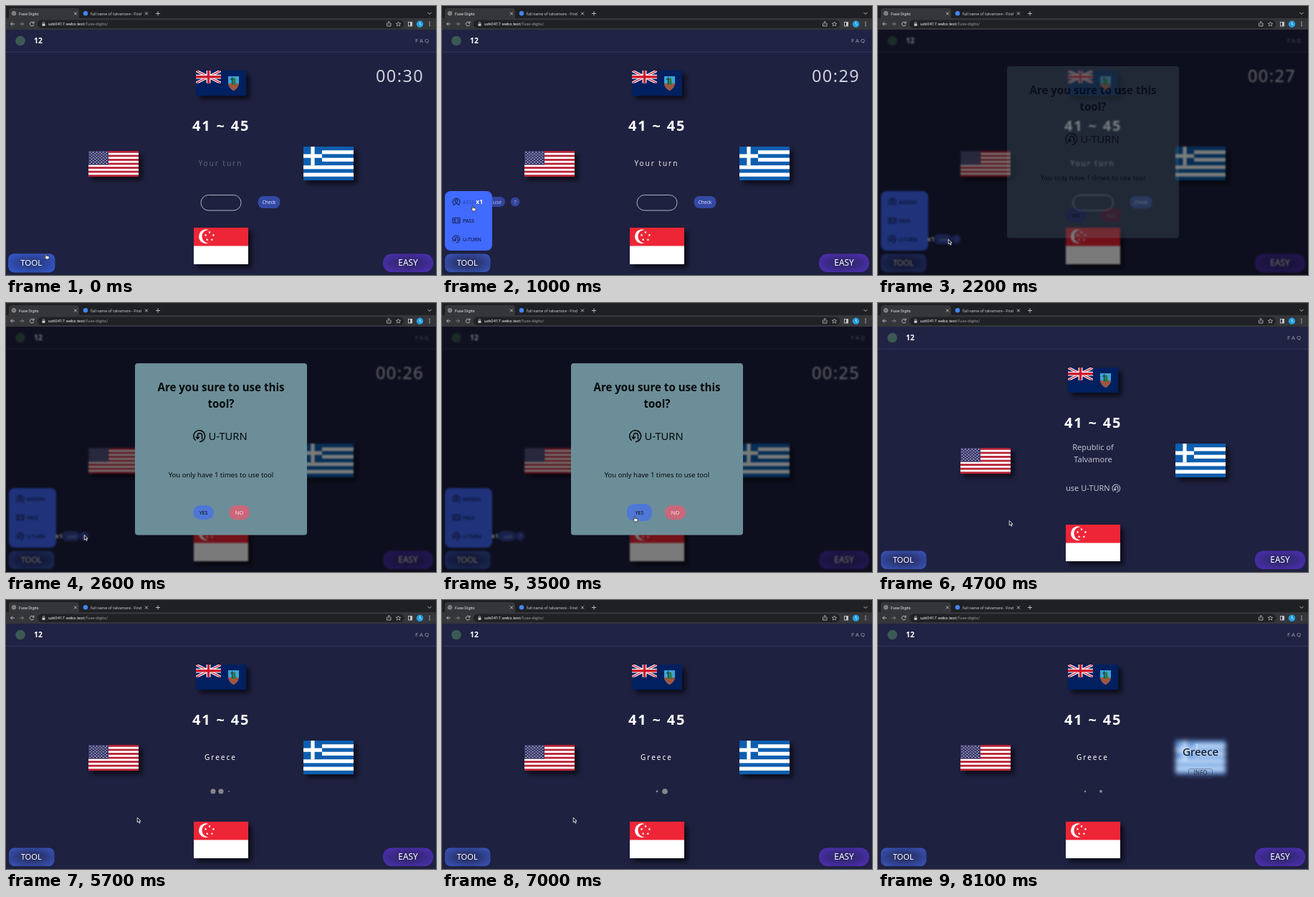
These frames come from a looping animation (600 px wide and 375 px high, 8200 ms). An HTML page:

```html
<!DOCTYPE html>
<html lang="en">
<head>
<meta charset="utf-8">
<title>Fuse Digits</title>
<style>
html, body { margin: 0; width: 100%; height: 100%; overflow: hidden; background: #1f2140; }
svg { display: block; }
text { font-family: 'Noto Sans', sans-serif; white-space: pre; }
.ui text { font-family: Roboto, sans-serif; }
.mid { text-anchor: middle; }
.line { fill: none; stroke: currentColor; }
.flag { filter: drop-shadow(5px 5px 3px #0009); }
</style>
</head>
<body>
<svg id="stage" width="600" height="375" viewBox="0 0 600 375"></svg>
<script>
const LOOP = 8200;
const $ = id => document.getElementById(id);
const ramp = (t, a, b) => Math.min(1, Math.max(0, (t - a) / (b - a)));
const ease = p => p * p * (3 - 2 * p);
const range = (n, f) => Array.from({ length: n }, (_, i) => f(i)).join('');

const rect = (x, y, w, h, fill, more = '') =>
  `<rect x="${x}" y="${y}" width="${w}" height="${h}" fill="${fill}" ${more}/>`;
const disc = (x, y, r, fill, more = '') =>
  `<circle cx="${x}" cy="${y}" r="${r}" fill="${fill}" ${more}/>`;
const path = (d, stroke, w, more = '') =>
  `<path d="${d}" fill="none" stroke="${stroke}" stroke-width="${w}" ${more}/>`;
const text = (x, y, size, fill, str, more = '') =>
  `<text x="${x}" y="${y}" font-size="${size}" fill="${fill}" ${more}>${str}</text>`;
const mid = 'class="mid"', bold = 'font-weight="700"';
const spaced = n => `letter-spacing="${n}"`;
const icon = (id, x, y, s) => `<use href="#${id}" transform="translate(${x} ${y}) scale(${s})"/>`;

function star(x, y, r) {
  const pts = Array.from({ length: 10 }, (_, i) => {
    const a = i * Math.PI / 5, d = i % 2 ? r * .4 : r;
    return `${x + d * Math.sin(a)},${y - d * Math.cos(a)}`;
  });
  return `<polygon points="${pts.join(' ')}" fill="#fff"/>`;
}

function glow(id, inner, outer) {
  return `<radialGradient id="${id}" r=".62"><stop offset=".15" stop-color="${inner}"/>
    <stop offset="1" stop-color="${outer}"/></radialGradient>`;
}

const defs = `<defs>
  ${glow('blue', '#252b5c', '#3852b4')}${glow('bluer', '#26387c', '#3558c8')}
  ${glow('violet', '#2d2668', '#4d2fb0')}
  <clipPath id="jack">${rect(265, 90, 35, 17.5, '#000')}</clipPath>
  <g id="uturn">${path('M-6 7A9 9 0 1 1 0 9', 'currentColor', 1.7)}
    ${path('M4 5V-1A3.5 3.5 0 0 0 -3 -1V4M-6 1L-3 4.5L0 1', 'currentColor', 1.7)}</g>
  <g id="assign">${path('M-6 7A9 9 0 1 1 6 7M-7 9Q0 -1 7 9', 'currentColor', 1.7)}
    ${disc(0, -2, 3.5, 'none', 'stroke="currentColor" stroke-width="1.7"')}</g>
  <g id="pass">${path('M-9 -6H9V6H-9ZM2 -2H7M2 2H7M-6 3H-1', 'currentColor', 1.5)}
    ${disc(-4, -1.5, 2, 'currentColor')}</g>
</defs>`;

const grey = '#c4c7cb';
const browser = `<g class="ui">
  ${rect(0, 0, 600, 18, '#1f2023')}
  ${rect(4, 3, 98, 20, '#35363a', 'rx="4"')}${rect(0, 17, 600, 16, '#35363a')}
  ${disc(11, 10.3, 2.8, '#777', 'stroke="#aaa" stroke-width=".7"')}
  ${text(18, 12.5, 5.6, '#e4e6e8', 'Fuse Digits')}
  ${disc(111, 10.3, 3.2, '#4285f4')}
  ${text(118, 12.5, 5.6, grey, 'full name of talvamore - Find')}
  ${path('M95 8.5l4 4m0 -4l-4 4M194 8.5l4 4m0 -4l-4 4M209 10.5h6m-3 -3v6M588.5 9l2.5 2.5l2.5 -2.5', grey, .9)}
  ${rect(44, 19.5, 511, 11.5, '#202124', 'rx="5.7"')}
  ${path('M12 25H6.5m2.5 -2.5l-2.5 2.5l2.5 2.5M38.5 23.5A2.8 2.8 0 1 0 38.8 26M39 21.5v2.5h-2.5', grey, .9)}
  ${path('M19 25h5.5m-2.5 -2.5l2.5 2.5l-2.5 2.5', '#8a8c90', .9)}
  ${rect(50.5, 24.5, 4, 3.3, grey)}${path('M51.3 24.5v-1a1.2 1.2 0 0 1 2.4 0v1', grey, .7)}
  <text x="59" y="27.2" font-size="6" fill="#eee">uzk0417.webs.test<tspan fill="#96999d">/fuse-digits/</tspan></text>
  ${path('M532.5 24h-1v4h5.5v-4h-1M534.2 26v-4.5m-1.5 1.5l1.5 -1.5l1.5 1.5', grey, .8)}
  ${path('M547.5 22l1 2.2h2.3l-1.8 1.5l.7 2.4l-2.2 -1.4l-2.2 1.4l.7 -2.4l-1.8 -1.5h2.3z', grey, .7)}
  ${rect(561.5, 22.5, 5, 5.5, 'none', `stroke="${grey}" stroke-width=".9"`)}${rect(564, 22.5, 2.5, 5.5, grey)}
  ${disc(577.5, 25.2, 4.7, '#24a0e0')}${path('M577.5 22.5v3l2 1', '#dff3ff', .9)}
  ${disc(591, 22.5, .8, grey)}${disc(591, 25, .8, grey)}${disc(591, 27.5, .8, grey)}
</g>`;

const montserrat = `<g class="flag">${rect(265, 90, 70, 35, '#00205f')}
  <g clip-path="url(#jack)">
    ${path('M265 90l35 17.5M300 90l-35 17.5', '#fff', 3.6)}${path('M265 90l35 17.5M300 90l-35 17.5', '#cf142b', 1.2)}
    ${path('M282.5 90v18M265 98.7h35', '#fff', 5.8)}${path('M282.5 90v18M265 98.7h35', '#cf142b', 3.4)}</g>
  <path d="M310 98h15v9q0 7 -7.5 11q-7.5 -4 -7.5 -11z" fill="#3aa6d8"/>
  <path d="M310 108h15q-1 6 -7.5 10q-6.5 -4 -7.5 -10z" fill="#a3543c"/>
  ${path('M313 102h5M315.5 99v10', '#222', 1)}<path d="M317 100l3 1l1 9h-5z" fill="#2b7a45"/></g>`;

const america = `<g class="flag">${rect(115, 202, 70, 36, '#fff')}
  ${range(7, i => rect(115, 202 + i * 72 / 13, 70, 36 / 13, '#b82236'))}
  ${rect(115, 202, 28, 19.4, '#3c3b6e')}
  ${range(9, i => path(`M${117.3 + i % 2 * 2.33} ${204 + i * 1.93}H${141 - i % 2 * 2}`, '#fff', 1.3,
    'stroke-dasharray="0 4.66" stroke-linecap="round"'))}</g>`;

const greece = `<g id="greece">${rect(415, 196, 70, 47, '#fff')}
  ${range(5, i => rect(415, 196 + i * 94 / 9, 70, 47 / 9, '#0d5eaf'))}
  ${rect(415, 196, 26, 26.1, '#0d5eaf')}${path('M428 196v26.1M415 209.05h26', '#fff', 5.2)}
  <rect id="haze" x="415" y="196" width="70" height="47" fill="#b4d2ff"/></g>`;

const city = `<g id="city" class="flag">${rect(262, 309, 76, 51, '#fff')}${rect(262, 309, 76, 25.5, '#ee2536')}
  ${disc(279, 321.2, 10, '#fff')}${disc(282.8, 321.2, 9.3, '#ee2536')}
  ${range(5, i => star(284 + 5.7 * Math.sin(i * 1.2566), 321.2 - 5.7 * Math.cos(i * 1.2566), 2.1))}</g>`;

const tools = [
  { name: 'ASSIGN', id: 'assign', y: 273, from: 800, to: 1250 },
  { name: 'PASS', id: 'pass', y: 299, from: 1250, to: 1500 },
  { name: 'U-TURN', id: 'uturn', y: 325, from: 1500, to: 3650 }
];

const menu = `
  <g id="use">${rect(-14, -7, 25, 14, '#33459c', 'rx="7"')}${text(0, 2.5, 7.5, '#aebcf0', 'use', mid)}</g>
  <g id="help">${disc(0, 0, 6.3, '#33459c')}${text(0, 2.8, 7.5, '#aebcf0', '?', mid)}</g>
  <svg id="menu" x="4" width="66"><rect id="panel" width="66" rx="8" fill="#416aff"/>
    <g color="#0a0f28">${tools.map(o => icon(o.id, 16, o.y - 258, .56) +
      text(25, o.y - 255.3, 7, '#0a0f28', o.name, `id="t-${o.id}"`)).join('')}</g></svg>
  <g id="count">${text(0, 3, 8.5, '#fff', 'x1', `class="mid" ${bold}`)}</g>`;

const page = `${rect(0, 33, 600, 31, '#212344')}${rect(0, 63.5, 600, 1.6, '#2d2f54')}
  <g id="page">
  ${disc(20, 48.5, 6.8, '#3c5a55')}
  ${text(39, 52.2, 10.3, '#fff', '12', bold)}
  ${text(571, 51, 7.8, '#9a9cb0', 'FAQ', spaced(2.1))}
  ${montserrat}${america}${greece}${city}
  ${text(260, 174.3, 20, '#fff', '41 ~ 45', bold + spaced(1.8))}
  <g id="turn">
    ${text(516, 105.5, 23.5, '#d0d1de', '', `id="clock" font-weight="300" ${spaced(1.4)}`)}
    ${text(268.5, 222.7, 10, '#fff', 'Your turn', `id="yours" ${spaced(1.95)}`)}
    ${rect(272, 263.5, 56, 21.5, 'none', 'rx="10.7" stroke="#b0b2c6"')}
    ${rect(351.5, 265, 31, 17, '#3449a4', 'rx="8"')}
    ${text(367, 275.8, 6.7, '#dfe4ff', 'Check', mid)}
  </g>
  <g id="notice" color="#c0c2d2">
    ${text(300, 205.2, 11, '#c0c2d2', 'Republic of', mid)}${text(300, 221.5, 11, '#c0c2d2', 'Talvamore', mid)}
    ${text(262, 262.3, 11, '#c0c2d2', 'use U-TURN')}${icon('uturn', 332.5, 258.5, .6)}
  </g>
  <g id="next">${text(277, 222.7, 10, '#fff', 'Greece', spaced(2))}
    ${range(3, i => disc(289 + 11 * i, 266.8, 1, '#85868c', `id="dot${i}"`))}</g>
  <g id="info">${text(450, 217.3, 15.2, '#05070c', 'Greece', mid)}
    ${rect(433.5, 235.5, 33, 13, 'none', 'rx="2" stroke="#39425e" stroke-width=".8" stroke-opacity=".6"')}
    ${text(450, 244.3, 8, '#2c3140', 'INFO', mid)}</g>
  ${menu}
  <g id="tool">${rect(4, 345.5, 63.5, 25.5, 'url(#blue)', 'id="toolBox" rx="8"')}
    ${text(35.3, 362, 11.2, '#fff', 'TOOL', mid)}</g>
  ${rect(526, 345.5, 70, 25.5, 'url(#violet)', 'rx="12"')}
  ${text(561, 362, 11.8, '#fff', 'EASY', mid)}
  </g>`;

const dialog = `<rect id="shade" y="33" width="600" height="342"/>
  <g id="dialog" color="#06090c">${rect(180, 84, 240, 239.5, '#6c8e98', 'rx="4"')}
    ${text(300, 122.5, 15.1, '#06090c', 'Are you sure to use this', `class="mid" ${bold}`)}
    ${text(300, 145.5, 15.1, '#06090c', 'tool?', `class="mid" ${bold}`)}
    ${icon('uturn', 270, 185.5, .88)}${text(282.5, 191, 14.7, '#06090c', 'U-TURN')}
    ${text(300, 243, 9.5, '#06090c', 'You only have 1 times to use tool', mid)}
    <rect id="yes" fill="#4f78d6" rx="10"/>${text(275.5, 294.7, 7.3, '#06090c', 'YES', mid)}
    ${rect(311, 282, 29, 20, '#c9687a', 'rx="9.5"')}${text(325.5, 294.9, 7.6, '#ffe0e4', 'NO', mid)}
  </g>`;

const ink = 'stroke="#fff" stroke-width=".8" stroke-linejoin="round"';
const cursor = `<g id="cursor">
  <path id="arrow" d="M-1.8 -3.6v6.6l1.6 -1.4l1.2 2.6l1.2 -.6l-1.2 -2.5h2.1z" fill="#111" ${ink}/>
  <path id="hand" d="M-1.8 -3.6q1 -.8 1.4 .4v2.4l3 .7q1 .4 .6 2l-.8 2h-3.6l-2.2 -3.2q.2 -1 1.6 0z" fill="#fff"
    stroke="#111" stroke-width=".7"/>
  <path id="beam" d="M-1.5 -4q1.5 0 1.5 1.2v5.6q0 1.2 -1.5 1.2M1.5 -4q-1.5 0 -1.5 1.2m0 5.6q0 1.2 1.5 1.2"
    fill="none" stroke="#e8eefc" stroke-width=".8"/></g>`;

$('stage').innerHTML = defs + rect(0, 33, 600, 342, '#1f2140') + page + dialog + browser + cursor;

// time, x, y
const route = [[0, 57, 349], [450, 56, 349], [950, 44, 282], [1150, 44, 282], [1650, 46, 325],
  [2000, 100, 329], [2500, 100, 329], [3150, 270, 301], [3620, 270, 301], [3850, 187, 307],
  [4500, 185, 307], [7150, 185, 307], [7750, 445, 205], [LOOP, 445, 205]];

function cursorAt(t) {
  const i = route.findIndex(p => p[0] > t), [a, x, y] = route[i - 1], [b, u, v] = route[i];
  const p = ease(ramp(t, a, b));
  return [x + (u - x) * p, y + (v - y) * p];
}

const show = (id, on) => $(id).setAttribute('opacity', +on);
const place = (id, x, y) => $(id).setAttribute('transform', `translate(${x} ${y})`);
function set(id, attrs) {
  for (const k in attrs) $(id).setAttribute(k, attrs[k]);
}

function drawMenu(t) {
  const open = ease(ramp(t, 250, 550)) * (1 - ramp(t, 3650, 3950)), h = 83 * open;
  set('menu', { y: 341 - h, height: h, opacity: Math.min(1, open * 1.5) });
  set('panel', { height: h });
  const hot = tools.find(o => t >= o.from && t < o.to);
  const p = hot ? ramp(t, hot.from, hot.from + 400) : 0;
  for (const o of tools) show('t-' + o.id, o === hot ? 1 - .6 * Math.sin(Math.PI * p) : 1);
  [['count', 30, 74], ['use', 62, 92], ['help', 95, 109]].forEach(([id, a, b]) => {
    place(id, a + (b - a) * p, hot ? hot.y : 0);
    show(id, Math.min(1, 2 * p));
  });
  const over = t < 550;
  set('toolBox', { fill: over ? 'url(#bluer)' : 'url(#blue)' });
  set('tool', { transform: over ? 'translate(35.5 358) scale(1.03) translate(-35.5 -358)' : '' });
}

function drawDialog(t) {
  const gone = ramp(t, 3600, 3750), shade = ramp(t, 2030, 2150) * (1 - gone);
  $('page').style.filter = shade ? `blur(${shade}px)` : '';
  show('shade', .52 * shade);
  show('dialog', ramp(t, 2100, 2600) * (1 - gone));
  const grow = ramp(t, 3080, 3200) * 3;
  set('yes', { x: 261 - grow, y: 282 - grow * .7, width: 29 + 2 * grow, height: 20 + grow * 1.4 });
}

function drawGame(t) {
  show('turn', t < 3650);
  $('clock').textContent = '00:' + (30 - Math.max(0, Math.floor((t - 350) / 750) + 1));
  show('yours', .65 - .35 * Math.cos(2 * Math.PI * t / 1600));
  show('notice', t < 4900 ? ramp(t, 3650, 3950) : 0);
  show('next', t >= 4900);
  for (let i = 0; i < 3; i++) {
    const a = 40 - 80 * i + 360 * (t - 5700) / 929;
    set('dot' + i, { r: 2 + 2 * Math.cos(a * Math.PI / 180) });
  }
  const soft = 1.6 * ramp(t, 3620, 3750) * (1 - ramp(t, 3750, 4150));
  $('city').style.filter = soft ? `blur(${soft}px) drop-shadow(5px 5px 3px #0009)` : '';
  const hover = ramp(t, 7700, 8100);
  $('greece').style.filter = `blur(${3 * hover}px) drop-shadow(5px 5px 3px rgba(0,0,0,${.6 * (1 - hover)}))`;
  show('haze', .55 * hover);
  show('info', hover);
}

function drawCursor(t) {
  place('cursor', ...cursorAt(t));
  const hand = t < 2050 || t > 3080 && t < 3640, beam = t > 7850;
  show('hand', hand);
  show('beam', beam);
  show('arrow', !hand && !beam);
}

function frame(now) {
  const t = now % LOOP;
  drawMenu(t);
  drawDialog(t);
  drawGame(t);
  drawCursor(t);
  requestAnimationFrame(frame);
}
requestAnimationFrame(frame);
</script>
</body>
</html>
```
